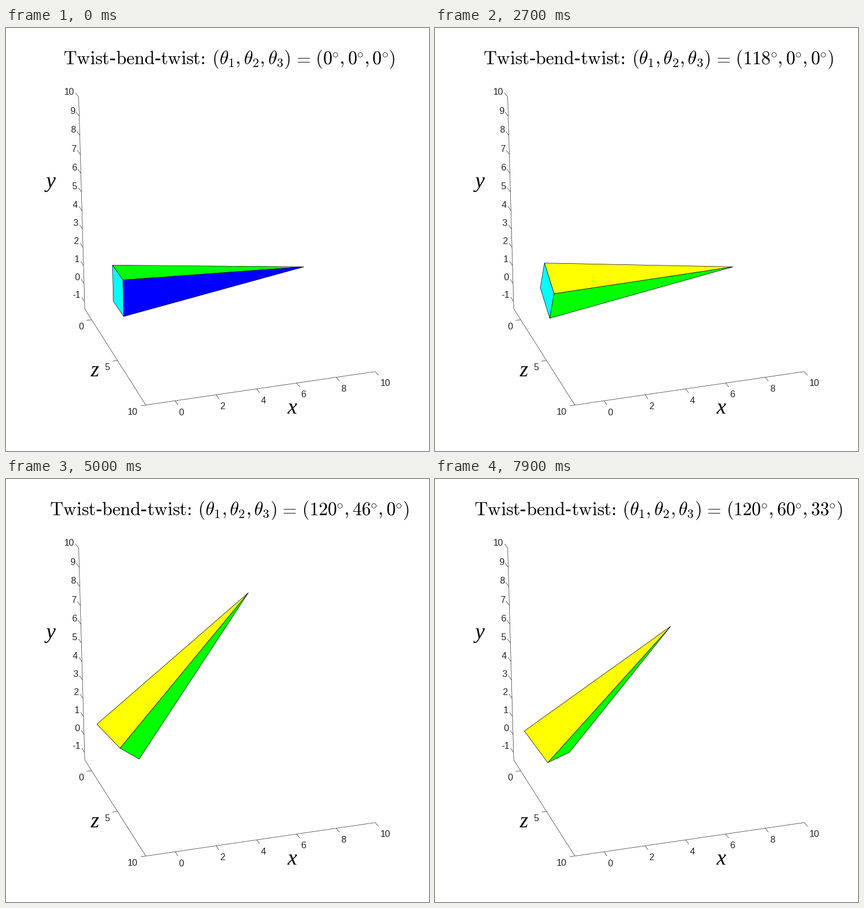
A matplotlib script that plays this animation: 748 by 748 pixels, repeating every 8 s.

```python
import numpy as np
import matplotlib.pyplot as plt
from matplotlib.animation import FuncAnimation
from matplotlib.patches import Polygon

SIZE, DPI = 748, 100
FRAMES, STEP = 80, 100
PHASE = 30                       # frames per rotation stage
GOALS = (120, 60, 45)            # final angles in degrees
LOW, HIGH = -np.sqrt(2), 10      # limits of all three axes
INK = "#262626"
EM = 32.57                       # title font size in pixels
BASELINE = 63.7

plt.rcParams["mathtext.fontset"] = "cm"
plt.rcParams["font.family"] = "Liberation Sans"

fig = plt.figure(figsize=(SIZE / DPI, SIZE / DPI), dpi=DPI, facecolor="white")
ax = fig.add_axes([0, 0, 1, 1])
ax.set_xlim(0, SIZE)
ax.set_ylim(SIZE, 0)
ax.axis("off")


def pt(px):
    return px * 72 / DPI


# Perspective camera aimed at the centre of the axes box
az, el = np.radians((18, 22))
RIGHT = np.array([np.cos(az), 0, np.sin(az)])
UP = np.array([np.sin(el) * np.sin(az), np.cos(el), -np.sin(el) * np.cos(az)])
TOWARD = np.array([-np.sin(az) * np.cos(el), np.sin(el), np.cos(az) * np.cos(el)])
CENTER = (LOW + HIGH) / 2
DISTANCE = 8.557 * (HIGH - LOW)
FOCAL = 3560


def project(points):
    q = np.asarray(points, float) - CENTER
    k = FOCAL / (DISTANCE - q @ TOWARD)
    return np.stack([387.3 + k * (q @ RIGHT), 361.5 - k * (q @ UP)], axis=-1)


def line(a, b):
    ax.plot([a[0], b[0]], [a[1], b[1]], color=INK, lw=pt(0.7),
            solid_capstyle="butt")


def tick(point, outward, length=9):
    start = project(point)
    way = project(np.add(point, outward)) - start
    line(start, start + length * way / np.hypot(*way))


def number(value, pos, ha):
    ax.text(pos[0], pos[1], str(value), size=pt(16.4), color=INK, ha=ha,
            va="center_baseline")


def draw_axes():
    path = project([(LOW, HIGH, LOW), (LOW, LOW, LOW),
                    (LOW, LOW, HIGH), (HIGH, LOW, HIGH)])
    for a, b in zip(path, path[1:]):
        line(a, b)
    for y in range(-1, 11):
        tick((LOW, y, LOW), (0, 0, -0.5))
        number(y, project((LOW, y, LOW - 0.84)) + (-0.2, -1), "right")
    for z in (0, 5, 10):
        tick((LOW, LOW, z), (-0.5, 0, 0))
        number(z, project((LOW - 0.4, LOW, z)) + (0, 9.3), "right")
    for x in range(0, 11, 2):
        tick((x, LOW, HIGH), (0, 0, 0.5))
        number(x, project((x, LOW, HIGH + 0.68)) + (-1, 8.6), "left")
    for name, x, y in (("x", 506, 682.5), ("y", 78.5, 282), ("z", 156.5, 616)):
        ax.text(x, y, name, size=pt(38), family="Liberation Serif",
                style="italic", ha="center", va="baseline")


# Title: runs of (text, advance in em, scale, rise in em)
def plain(s, width):
    return (rf"$\text{{{s}}}$", width, 1, 0)


def gap(width):
    return ("", width, 1, 0)


def tuple_runs(items):
    runs = [plain("(", 0.389)]
    for i, item in enumerate(items):
        if i:
            runs += [plain(",", 0.278), gap(0.167)]
        runs += item
    return runs + [plain(")", 0.389)]


def title_runs(angles):
    hyphen = ("-", 0.333, 1, 0)
    names = [[(r"$\theta$", 0.469, 1, 0), (rf"$\text{{{i}}}$", 0.408, 0.7, -0.15)]
             for i in (1, 2, 3)]
    values = [[plain(str(v), 0.5 * len(str(v))), (r"$\circ$", 0.395, 0.7, 0.363)]
              for v in angles]
    return ([plain("Twist", 2.505), hyphen, plain("bend", 2.112), hyphen,
             plain("twist:", 2.45), gap(0.333)]
            + tuple_runs(names)
            + [gap(0.278), plain("=", 0.778), gap(0.278)]
            + tuple_runs(values))


title = []


def draw_title(angles):
    while title:
        title.pop().remove()
    runs = title_runs(angles)
    x = 395.1 - EM * sum(r[1] for r in runs) / 2
    for text, width, scale, rise in runs:
        if text:
            title.append(ax.text(x, BASELINE - rise * EM, text,
                                 size=pt(EM * scale), family="Liberation Serif",
                                 ha="left", va="baseline"))
        x += width * EM


# Pyramid: square base around the origin, tip on the x axis
SOLID = np.array([(0, 1, -1), (0, 1, 1), (0, -1, 1), (0, -1, -1), (10, 0, 0)])
FACES = [((0, 1, 4), "#00ff00"), ((1, 2, 4), "#0000ff"), ((2, 3, 4), "#ff0000"),
         ((3, 0, 4), "#ffff00"), ((3, 2, 1, 0), "#00ffff")]
patches = [ax.add_patch(Polygon(np.zeros((3, 2)), closed=True, fc=color,
                                ec="black", lw=pt(0.7), joinstyle="bevel"))
           for _, color in FACES]


def twist(deg):
    c, s = np.cos(np.radians(deg)), np.sin(np.radians(deg))
    return np.array([(1, 0, 0), (0, c, -s), (0, s, c)])


def bend(deg):
    c, s = np.cos(np.radians(deg)), np.sin(np.radians(deg))
    return np.array([(c, -s, 0), (s, c, 0), (0, 0, 1)])


def angles_at(n):
    t = np.clip((n - PHASE * np.arange(3)) / (PHASE - 1), 0, 1)
    return np.array(GOALS) * t * t * (3 - 2 * t)


def update(n):
    first, second, third = angles = angles_at(n)
    turn = twist(third) @ bend(second) @ twist(first)
    flat = project(SOLID @ turn.T)
    for patch, (corners, _) in zip(patches, FACES):
        shape = flat[list(corners)]
        (ux, uy), (vx, vy) = shape[1] - shape[0], shape[2] - shape[0]
        patch.set_xy(shape)
        patch.set_visible(ux * vy - uy * vx < 0)   # hide faces turned away
    draw_title([int(round(a)) for a in angles])
    return patches + title


draw_axes()
anim = FuncAnimation(fig, update, frames=FRAMES, interval=STEP,
                     init_func=lambda: update(0), repeat=True, repeat_delay=0)
plt.show()
```
